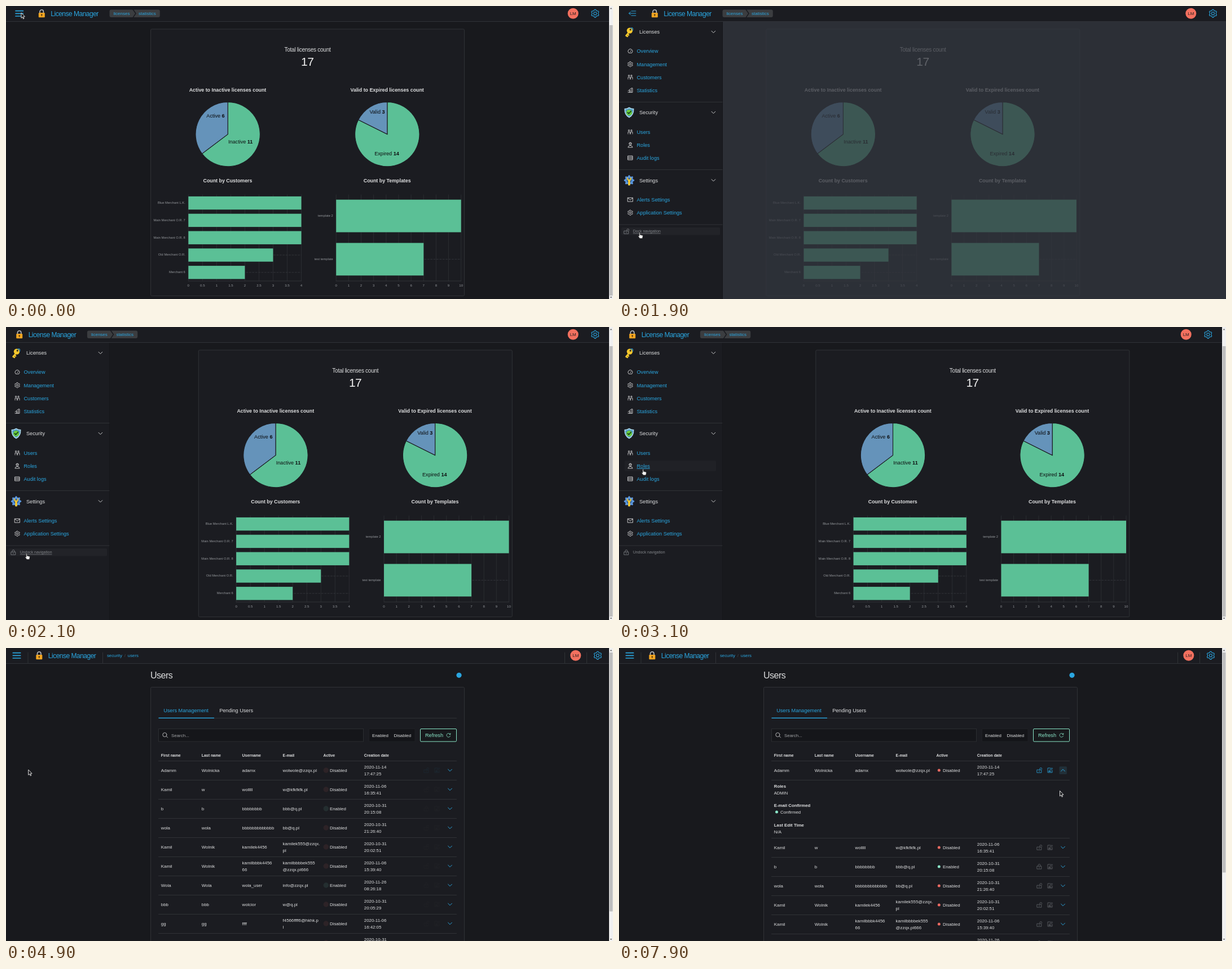
An HTML page that plays this animation: 1076 px wide and 520 px high, repeating every 8 s.

```html
<!DOCTYPE html>
<html lang="en">
<head>
<meta charset="utf-8">
<title>License Manager</title>
<style>
  html, body { margin: 0; width: 100%; height: 100%; overflow: hidden; background: #18191d; }
  svg { display: block; width: 1076px; height: 520px; font-family: "Liberation Sans", Arial, sans-serif; }
  text { white-space: pre; }
  .line { fill: none; stroke-linecap: round; stroke-linejoin: round; }
  .hover text { text-decoration: underline; }
  .link > rect { opacity: 0; }
  .hover > rect { opacity: 1; }
</style>
</head>
<body>
<svg id="stage" viewBox="0 0 1076 520"></svg>
<script>
const LOOP = 8000;
const C = {
  body: '#18191d', card: '#1b1c21', rule: '#303236', blue: '#2aa6e0', text: '#dedfe0',
  green: '#5bc096', steel: '#6593ba', red: '#ea6a62', mint: '#8ae6c8', dim: '#94979b', icon: '#62656a'
};

// ---- drawing helpers -------------------------------------------------
const text = (x, y, s, size = 7.85, fill = C.text, extra = '') =>
  `<text x="${x}" y="${(y + size * 0.36).toFixed(2)}" font-size="${size}" fill="${fill}" ${extra}>${s}</text>`;
const mid = 'text-anchor="middle"', end = 'text-anchor="end"', bold = 'font-weight="700"';
const rect = (x, y, w, h, fill, extra = '') =>
  `<rect x="${x}" y="${y}" width="${w}" height="${h}" fill="${fill}" ${extra}/>`;
const line = (d, stroke = C.rule, w = 1, extra = '') =>
  `<path class="line" d="${d}" stroke="${stroke}" stroke-width="${w}" ${extra}/>`;
const dot = (x, y, r, fill, extra = '') => `<circle cx="${x}" cy="${y}" r="${r}" fill="${fill}" ${extra}/>`;
const at = (x, y, s, extra = '') => `<g transform="translate(${x} ${y})" ${extra}>${s}</g>`;
const group = (id, s) => `<g id="${id}">${s}</g>`;
const range = n => [...Array(n).keys()];

const gearPath = (r, teeth) => 'M' + range(teeth * 4).map(i => {
  const a = (i - 0.5) * Math.PI / teeth / 2, q = i % 4 < 2 ? r : r * 0.78;
  return (q * Math.sin(a)).toFixed(2) + ' ' + (-q * Math.cos(a)).toFixed(2);
}).join('L') + 'Z';
const gear = (r, color, w) =>
  line(gearPath(r, 6), color, w) + `<circle r="${r * 0.36}" fill="none" stroke="${color}" stroke-width="${w}"/>`;
const chevron = (color, w = 1, up = false) => line(up ? 'M-3.4 1.7L0 -1.7L3.4 1.7' : 'M-3.4 -1.7L0 1.7L3.4 -1.7', color, w);
const padlock = (open, color) =>
  line('M-3.8 -.8H3.8V4.2H-3.8ZM0 1v1.4' +
    (open ? 'M1 -.8V-2.6a1.8 1.8 0 0 1 3.6 0v.8' : 'M-2 -.8V-2.4a2 2 0 0 1 4 0V-.8'), color, 0.8);
const pencil = color => line('M1 -4H-4V4H4V0M-1.6 1.6L-1.2 -.2L3.4 -4.2L4.6 -3L.2 1.2ZM-2.4 2.4H2', color, 0.8);

// ---- statistics page -------------------------------------------------
const pie = (cx, cy, r, share) => {
  const a = share * 2 * Math.PI, x = cx + r * Math.sin(a), y = cy - r * Math.cos(a), top = `${cx} ${cy - r}`;
  const slice = (from, to, big, fill) =>
    `<path d="M${cx} ${cy}L${from}A${r} ${r} 0 ${big} 1 ${to}Z" fill="${fill}" stroke="${C.card}" stroke-width="1.1"/>`;
  return slice(top, `${x} ${y}`, 1, C.green) + slice(`${x} ${y}`, top, 0, C.steel);
};
const pieLabel = (x, y, name, n) => text(x, y, `${name} <tspan ${bold}>${n}</tspan>`, 9.1, '#0c0d0f', mid);

function bars(x, width, max, step, band, thick, rows) {
  const px = width / max, count = max / step;
  let s = '';
  for (const i of range(count + 1)) {
    const gx = x + i * step * px;
    s += line(`M${gx} 335V488`, '#2d2f34', 0.9) + text(gx, 496, i * step, 6.1, C.dim, mid);
  }
  rows.forEach(([name, n], i) => {
    const y = 334.2 + band * (i + 0.5);
    s += line(`M${x} ${y}H${x + width}`, '#34363b', 0.9, 'stroke-dasharray="3 2.4" stroke-linecap="butt"') +
      rect(x, y - thick / 2, n * px, thick, C.green) + text(x - 5.5, y - 0.6, name, 5.75, C.dim, end);
  });
  return s + line(`M${x} 488H${x + width}`, '#34363b', 0.9);
}

const heading = (x, y, s) => text(x, y, s, 8.85, C.text, `${mid} ${bold}`);
const stats =
  rect(256.5, 41, 556, 473.5, C.card, `rx="2" stroke="${C.rule}"`) +
  text(534.5, 77, 'Total licenses count', 10, C.text, `${mid} letter-spacing="-.27"`) +
  text(534.3, 98.5, '17', 21, '#f0f0f0', `${mid} letter-spacing="-.5"`) +
  heading(393, 149, 'Active to Inactive licenses count') + heading(675.7, 149, 'Valid to Expired licenses count') +
  heading(393, 310, 'Count by Customers') + heading(675.7, 310, 'Count by Templates') +
  pie(393.2, 227.6, 57.2, 11 / 17) + pie(675.8, 227.6, 57.2, 14 / 17) +
  pieLabel(371.5, 195, 'Active', 6) + pieLabel(415.7, 240.5, 'Inactive', 11) +
  pieLabel(658, 187.8, 'Valid', 3) + pieLabel(675, 261.3, 'Expired', 14) +
  bars(323.3, 200.2, 4, 0.5, 30.8, 23.4, [['Blue Merchant L.K.', 4], ['Main Merchant O.R. 7', 4],
    ['Main Merchant O.R. 8', 4], ['Old Merchant O.R.', 3], ['Merchant 6', 2]]) +
  bars(585.2, 221.5, 10, 1, 76.8, 57.8, [['template 2', 10], ['test template', 7]]);

// ---- side navigation -------------------------------------------------
const W = '#d8d9da';
const small = {
  dial: line('M-3 3A4 4 0 1 1 3 3ZM0 1L1.6 -1', W, 0.9),
  gear: gear(4.6, W, 0.9),
  people: line('M-3 -3.6h1.6v2h-1.6zM1.4 -3.6h1.6v2h-1.6zM-4 3.6V0h3.4V3.6M.6 3.6V0H4V3.6', W, 0.8),
  stats: line('M-4 4H4V-3.6H2V4M0 4V.4H-1.6V4M-4 1.4L1 -3', W, 0.8),
  person: line('M-2 -2.6a2 1.8 0 1 1 4 0v1a2 1.8 0 0 1 -4 0ZM-4 4Q-3 .8 0 .8T4 4ZM-2 -2.6H2', W, 0.9),
  stack: line('M-4 -3.5H4V3.5H-4ZM-4 -1.2H4M-4 1.2H4', W, 0.9),
  mail: line('M-4.4 -3.4H4.4V3.4H-4.4ZM-4.4 -3L0 .6L4.4 -3', W, 0.9)
};
const big = {
  key: line('M2.6 -2.6L-5.5 6.6M-5.5 6.6l2.6 1.4M-3 4l2 1.4', '#f6c72c', 2.6) +
    dot(1, -2.4, 5.2, '#f6c72c') + dot(2.2, -4, 1.5, C.card) + line('M3 -6.8Q7.6 -8 6.2 -3', '#2c7fa8', 1.8),
  shield: '<path d="M0 -9.5Q4 -7 8.5 -7Q9 5 0 9.5Q-9 5 -8.5 -7Q-4 -7 0 -9.5Z" fill="#a9d8ea"/>' +
    '<path d="M0 -7.4Q3.5 -5.4 6.8 -5.4Q7 4 0 7.4Q-7 4 -6.8 -5.4Q-3.5 -5.4 0 -7.4Z" fill="#4a93c4"/>' +
    dot(0, 0, 5.2, '#6ccb3f') + line('M-2.6 0L-.6 2L3 -2.2', '#17491d', 1.8),
  tools: `<path d="${gearPath(9.2, 8)}" fill="#5b96dd"/>` + dot(0, 0, 4.4, '#2d5f9e') +
    '<path d="M-3.6 -5.2V-1L-1.8 1V9H1.8V1L3.6 -1V-5.2L1.6 -4V-1.6H-1.6V-4Z" fill="#f6c72c"/>'
};
const links = [
  [80, 'Overview', 'dial'], [103.3, 'Management', 'gear'], [126.3, 'Customers', 'people'], [149.3, 'Statistics', 'stats'],
  [223.5, 'Users', 'people'], [246.5, 'Roles', 'person'], [269.5, 'Audit logs', 'stack'],
  [343.7, 'Alerts Settings', 'mail'], [366.8, 'Application Settings', 'gear']
];
const sidebar =
  rect(0, 27, 183.5, 493, C.card) + line('M183.5 28V520', '#15161a') +
  [[46, 'Licenses', 'key'], [189, 'Security', 'shield'], [309.3, 'Settings', 'tools']].map(([y, s, icon]) =>
    at(18, y, big[icon]) + text(36, y, s, 9.15) + at(167.4, y, chevron('#c8c9ca'))).join('') +
  [170.5, 290.5, 388].map(y => line(`M0 ${y}H183`)).join('') +
  links.map(([y, s, icon]) => `<g class="link">${rect(10, y - 9.5, 162, 19, '#202126', 'rx="2"')}` +
    at(20, y, small[icon]) + text(31.5, y, s, 9.15, C.blue) + '</g>').join('') +
  '<g class="link" id="dock">' + rect(4, 393, 175, 13.5, '#222328', 'rx="2"') +
  at(13, 400, group('dockOpen', padlock(true, '#84878b')) + group('dockShut', padlock(false, '#84878b'))) +
  text(24.8, 400, '<tspan id="dockText"></tspan>', 6.9, '#84878b') + '</g>';

// ---- users page ------------------------------------------------------
const people = [
  ['Adamm', 'Wolnicka', 'adamx', 'wolwole@zzqx.pl', 0, '2020-11-14 17:47:25'],
  ['Kamil', 'w', 'wolllll', 'w@kfkfkfk.pl', 0, '2020-11-06 16:35:41'],
  ['b', 'b', 'bbbbbbbb', 'bbb@q.pl', 1, '2020-10-31 20:15:08'],
  ['wola', 'wola', 'bbbbbbbbbbbbb', 'bb@q.pl', 0, '2020-10-31 21:26:40'],
  ['Kamil', 'Wolnik', 'kamilek4456', 'kamilek555@zzqx. pl', 0, '2020-10-31 20:02:51'],
  ['Kamil', 'Wolnik', 'kamilbbbk4456 66', 'kamilbbbbek555 @zzqx.pl666', 0, '2020-11-06 15:39:40'],
  ['Wola', 'Wola', 'wola_user', 'info@zzqx.pl', 1, '2020-11-26 08:26:18'],
  ['bbb', 'bbb', 'wolcior', 'w@q.pl', 0, '2020-10-31 20:05:29'],
  ['gg', 'gg', 'ffff', 'f4566ffff6@hkhk.p l', 0, '2020-11-06 16:42:05'],
  ['bb', 'bb', 'bbbbbbb', 'bbb@bubu.pl', 0, '2020-10-31 19:58:12']
];
const cols = [274.8, 346.8, 418.6, 490.6, 574, 634.8];
const cell = (x, y, s) => {
  const parts = s.split(' ');
  return parts.map((p, i) => text(x, y + (i - (parts.length - 1) / 2) * 12.2, p)).join('');
};
function personRow(p, i) {
  const y = 217 + 34 * i, tint = i ? C.icon : C.blue;
  const values = p.map((v, k) => k === 4 ? (v ? 'Enabled' : 'Disabled') : v);
  return values.map((v, k) => cell(cols[k], y, v)).join('') +
    at(567.3, y, dot(0, 0, 2.5, p[4] ? C.mint : C.red, 'class="badge"')) +
    at(745, y, padlock(!p[4], tint), 'class="fade"') + at(764, y, pencil(tint), 'class="fade"') +
    (i ? at(787, y, chevron(C.blue)) : '') + line(`M270.5 ${y + 17.5}H798.5`);
}
const users =
  rect(0, 27, 1076, 493, C.body) + text(256, 48.3, 'Users', 16, C.text, 'letter-spacing="-.5"') +
  dot(803, 48.3, 4.6, C.blue) + rect(256.5, 69.5, 556, 470, C.card, `rx="2" stroke="${C.rule}"`) +
  text(279.2, 111, 'Users Management', 9.15, C.blue) + text(378.2, 111, 'Pending Users', 9.15) +
  line('M270.5 124.5H798.5') + rect(270.5, 123.6, 98.5, 1.4, C.blue) +
  rect(270.5, 143.5, 363, 22.5, '#15161a', 'stroke="#2b2d31"') +
  line('M284.4 156.6L286.6 159M285 154a3.6 3.6 0 1 1 -7.2 0a3.6 3.6 0 1 1 7.2 0', '#c4c5c7', 0.9) +
  text(293, 155, 'Search...', 7.95, '#a3a5a8') +
  rect(643.5, 143.5, 81.5, 22.5, '#141519', 'stroke="#1f2024"') + text(649, 155, 'Enabled') + text(687.5, 155, 'Disabled') +
  rect(734.5, 143.5, 64, 22.5, '#17191c', `rx="1.5" stroke="${C.mint}"`) + text(743, 154.8, 'Refresh', 9.15, C.mint) +
  line('M787.4 153.2A3.4 3.4 0 1 0 787.6 156M787.8 151.4V153.4H785.8', C.mint, 0.8) +
  ['First name', 'Last name', 'Username', 'E-mail', 'Active', 'Creation date'].map((s, i) =>
    text(i === 4 ? 562.5 : cols[i], 190.3, s, 6.9, C.text, bold)).join('') + line('M270.5 200.5H798.5') +
  rect(780.5, 210.3, 13.4, 13.6, '#223039', 'id="toggleBg" rx="1.5"') +
  at(787, 217, group('down', chevron(C.blue)) + group('up', chevron(C.blue, 1, true))) +
  text(274.8, 245.3, 'Roles', 7.8, C.text, bold) + text(274.8, 257.5, 'ADMIN', 7.6) +
  text(274.8, 278.7, 'E-mail Confirmed', 7.8, C.text, bold) + dot(279.5, 291, 2.5, C.mint) + text(286, 291, 'Confirmed') +
  text(274.8, 314.3, 'Last Edit Time', 7.8, C.text, bold) + text(274.8, 326.3, 'N/A') +
  personRow(people[0], 0) +
  group('rest', rect(270, 234.5, 529, 400, C.card) + line('M270.5 234.5H798.5') +
    people.slice(1).map((p, i) => personRow(p, i + 1)).join(''));

// ---- header, scrollbar, cursors --------------------------------------
const header =
  rect(0, 0, 1076, 27, C.card) + line('M0 27.5H1076', '#303338') +
  group('dividers', [39, 171.5, 990.5, 1029.5].map(x => line(`M${x} 8V27`)).join('')) +
  rect(10, 0, 28, 27, '#24272c', 'id="menuBg"') +
  group('menu', line('M17 8.6H30.4M17 13.3H30.4M17 18H30.4', C.blue, 1.7)) +
  group('fold', line('M22 9H29.8M17.6 13H29.8M22 17H29.8M20.4 10.4L17.6 13L20.4 15.6', C.blue, 1)) +
  group('brand', line('M60 12.5V10a3.2 3.2 0 0 1 6.4 0V12.5', '#b9bcc0', 1.6) +
    rect(57.8, 12, 11, 8.2, '#f2a522', 'rx="1"') + dot(63.3, 15.4, 1.2, '#4a3412') + rect(62.8, 15.6, 1, 2.6, '#4a3412') +
    text(79.3, 13.3, 'License Manager', 12, C.blue, 'letter-spacing="-.5"') +
    group('crumbs', rect(183.5, 6.5, 89.3, 13.6, '#3b3d40', 'rx="3"') + line('M225 6L230 13.3L225 20.6', C.card, 1.6) +
      text(190.5, 13.3, 'licenses', 8, C.blue) + text(235, 13.3, 'statistics', 8, C.blue)) +
    group('path', text(183.4, 13.3, 'security', 7.85, C.blue) + text(214.3, 13.3, '/', 7.85, '#4a4c50') +
      text(220.3, 13.3, 'users', 7.85, C.blue))) +
  group('right', dot(1005.2, 13.2, 9.5, '#f3705f') + text(1005.2, 13.3, 'LM', 8, '#2a2020', mid) +
    at(1044.3, 13.2, gear(7, C.blue, 1.1)));

const scrollbar = rect(1069, 0, 7, 520, '#f0f0f0') + rect(1069.8, 8, 5.6, 459, '#bdbdbd', 'id="thumb"') +
  '<path d="M1070.6 5.2L1072.5 3L1074.4 5.2ZM1070.6 516L1072.5 518.2L1074.4 516Z" fill="#606060"/>';
const cursors =
  '<path id="arrow" d="M0 0V9.4L2.2 7.5L3.6 10.8L5 10.2L3.6 7L6.4 6.8Z" fill="#17181b" stroke="#f2f2f2" stroke-width=".9"/>' +
  '<path id="hand" d="M-.7 .5Q0 -.4 .8 .5V4L5 5Q6 5.4 5.8 6.6L5 10.6H.4L-2.6 6.6Q-2.4 5.4 -.7 6.4Z" fill="#f4f4f4" stroke="#1a1a1a" stroke-width=".6"/>';

const stage = document.getElementById('stage');
stage.innerHTML = rect(0, 0, 1076, 520, C.body) + group('stats', stats) +
  rect(0, 27, 1076, 493, '#32363e', 'id="mask"') + group('side', sidebar) + group('users', users) +
  group('header', header) + group('scroll', scrollbar) + group('cursor', cursors);

// ---- motion ----------------------------------------------------------
const cursorKeys = [[0, 27, 12], [300, 27, 12], [400, 27.5, 11], [800, 27, 11], [1000, 36, 120], [1200, 50, 310],
  [1400, 47, 409], [1500, 41, 407], [1600, 36.5, 402], [2400, 36.5, 402], [2700, 42, 358], [3000, 44, 270],
  [3300, 40, 217], [4100, 40, 217], [4200, 39.7, 216], [5200, 39.7, 216], [5300, 120, 206], [5400, 290, 182],
  [5500, 460, 155], [5600, 552, 142], [5700, 552, 142], [6000, 690, 135], [6200, 790, 175], [6350, 805, 236],
  [6600, 787, 216], [7600, 787, 216], [7700, 786, 232], [7900, 781.5, 253.5]];
const slideKeys = [[600, -184], [700, -146], [800, -66], [900, -18], [1000, 0]];
const maskKeys = [[500, 0], [600, 0.1], [700, 0.31], [800, 0.5], [900, 0.65], [1000, 0.76], [1900, 0.76], [2000, 0.3], [2100, 0]];
const shiftKeys = [[500, 0], [600, 4.2], [1900, 4.2], [2000, 48], [2100, 84.8], [2200, 91], [2300, 92.3]];
const openKeys = [[6600, 0], [6700, 24], [6800, 68], [6900, 95], [7000, 103]];

function track(keys, t, k = 1) {
  const i = keys.findIndex(key => key[0] > t);
  if (i === 0) return keys[0][k];
  if (i < 0) return keys[keys.length - 1][k];
  const a = keys[i - 1], b = keys[i];
  return a[k] + (b[k] - a[k]) * (t - a[0]) / (b[0] - a[0]);
}
const clamp = v => Math.max(0, Math.min(1, v));
const $ = id => document.getElementById(id);
const show = (id, on) => $(id).setAttribute('display', on ? 'inline' : 'none');
const move = (id, x, y = 0) => $(id).setAttribute('transform', `translate(${x} ${y})`);
const linkNodes = [...document.querySelectorAll('.link:not(#dock)')];
const badges = document.querySelectorAll('.badge'), fades = document.querySelectorAll('.fade');

function draw(t) {
  const drawer = t >= 600 && t < 2000, docked = t >= 2000 && t < 4400, onUsers = t >= 4400;
  const x = track(cursorKeys, t), y = track(cursorKeys, t, 2);

  show('stats', !onUsers);
  move('stats', track(shiftKeys, t));
  $('mask').setAttribute('opacity', onUsers ? 0 : track(maskKeys, t));
  show('side', drawer || docked);
  move('side', track(slideKeys, t));
  $('side').setAttribute('opacity', clamp(0.3 + (t - 700) / 300));

  const onDock = t >= 1400 && t < 2500;
  $('dock').classList.toggle('hover', onDock);
  show('dockOpen', !docked);
  show('dockShut', docked);
  $('dockText').textContent = docked ? 'Undock navigation' : 'Dock navigation';
  let onLink = false;
  linkNodes.forEach((node, i) => {
    const over = docked && !onDock && Math.abs(y - links[i][0]) < 9.5;
    node.classList.toggle('hover', over);
    onLink = onLink || over;
  });

  show('users', onUsers);
  $('users').setAttribute('opacity', clamp(0.3 + (t - 4400) / 430));
  const ready = clamp((t - 4870) / 330), open = track(openKeys, t), expanded = t >= 6700;
  badges.forEach(b => {
    b.setAttribute('opacity', ready);
    b.setAttribute('r', 2.5 + 2.5 * (1 - ready));
  });
  fades.forEach(f => f.setAttribute('opacity', ready));
  move('rest', 0, open);
  show('toggleBg', t >= 6500);
  show('down', !expanded);
  show('up', expanded);

  show('dividers', onUsers);
  show('menuBg', t >= 600 && t < 1000);
  show('menu', !drawer && !docked);
  move('menu', onUsers ? -4.7 : 0);
  show('fold', drawer);
  move('brand', docked ? -39.6 : onUsers ? -4.5 : 0);
  show('crumbs', !onUsers);
  show('path', onUsers);
  move('right', drawer ? 8.6 : onUsers ? 4.6 : 0);

  show('scroll', !drawer);
  $('thumb').setAttribute('y', onUsers ? 8 : 34);
  $('thumb').setAttribute('height', onUsers ? 459.5 - open * 0.67 : 480);

  const hand = (t >= 400 && t < 900) || onDock || (onLink && t < 4200) || (t >= 6500 && t < 7700);
  move('cursor', x, y);
  show('hand', hand);
  show('arrow', !hand);
}

const start = performance.now();
function tick() {
  draw(Math.floor(((performance.now() - start) % LOOP) / 100) * 100);
  requestAnimationFrame(tick);
}
tick();
</script>
</body>
</html>
```
